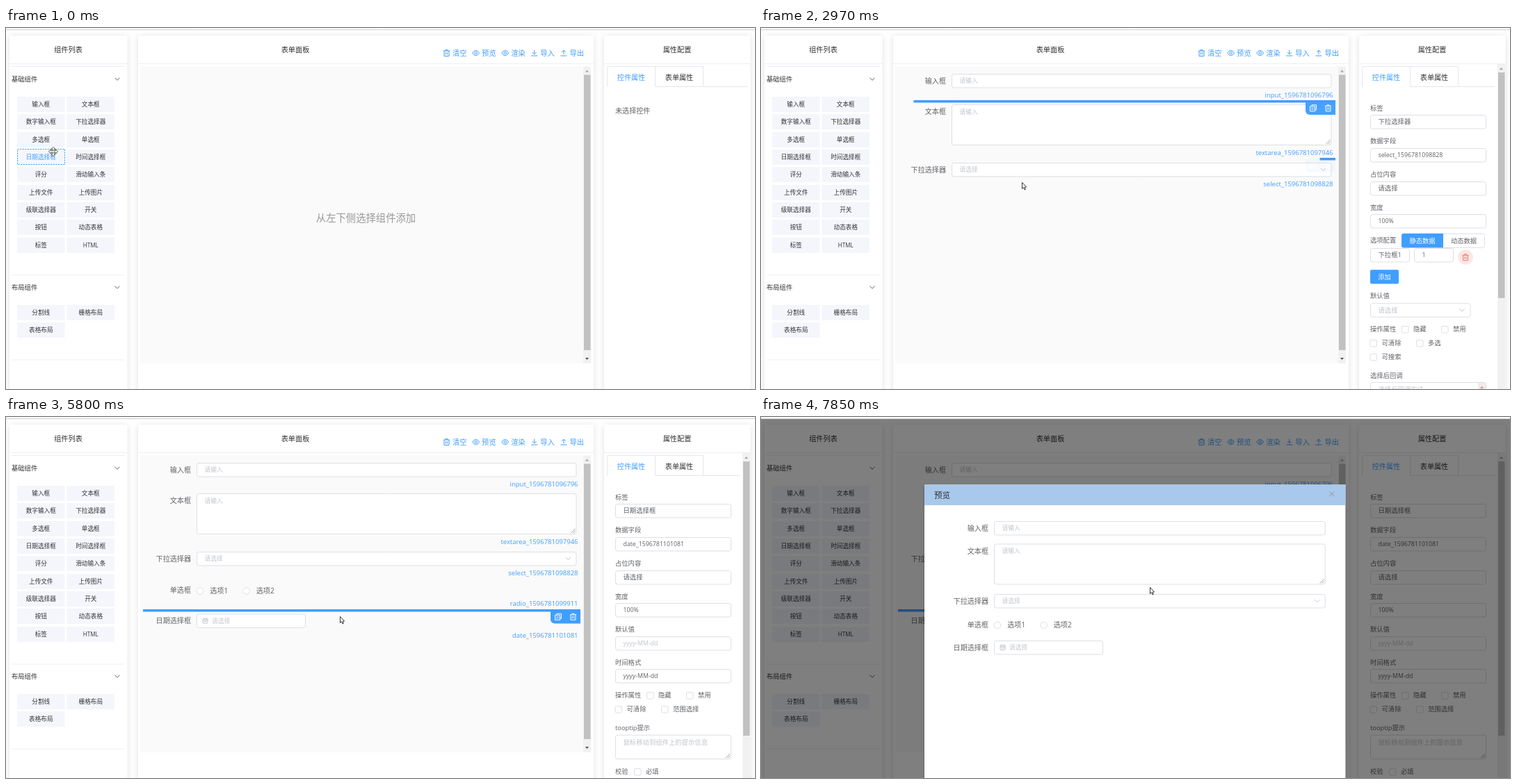
Recreate the animation shown at these times as an HTML page with a canvas. Size 1077x520 px, loop 8 s.

```html
<!DOCTYPE html>
<html lang="zh-CN">
<head>
<meta charset="utf-8">
<title>表单设计器</title>
<style>
html, body { margin: 0; width: 100%; height: 100%; overflow: hidden; background: #fff; }
canvas { display: block; }
</style>
</head>
<body>
<canvas id="stage" width="1077" height="520"></canvas>
<script>
const stage = document.getElementById('stage').getContext('2d');
const layer = document.createElement('canvas');
layer.width = 1077;
layer.height = 520;
const sheet = layer.getContext('2d');
let c = stage;

const FONT = '"Open Sans", "Noto Sans CJK SC", "Noto Sans CJK", sans-serif';
const BLUE = '#409eff', INK = '#303133', GREY = '#606266', HINT = '#c0c4cc', LINE = '#dcdfe6', PALE = '#ebeef5';
const LOOP = 8000;

const STEPS = [0, 200, 390, 570, 760, 940, 1130, 1330, 1540, 1740, 1950, 2150, 2350, 2550,
  2760, 2970, 3170, 3370, 3570, 3760, 3970, 4170, 4370, 4580, 4780, 5010, 5210, 5410, 5600,
  5800, 6020, 6210, 6410, 6620, 6830, 7030, 7240, 7430, 7640, 7850];

// Pointer path: time, x, y
const PATH = [[0, 68, 178], [390, 56, 112], [760, 350, 150], [940, 385, 170], [1330, 125, 112],
  [1540, 135, 114], [1950, 419, 191], [2150, 410, 190], [2550, 126, 138], [2970, 375, 222],
  [3170, 372, 222], [3570, 125, 162], [4170, 360, 262], [4780, 71, 186], [5210, 420, 287],
  [5410, 480, 287], [6020, 480, 287], [6830, 688, 42], [7240, 694, 35], [7430, 665, 105],
  [7850, 559, 245]];

const BASIC = ['输入框', '文本框', '数字输入框', '下拉选择器', '多选框', '单选框', '日期选择框', '时间选择框',
  '评分', '滑动输入条', '上传文件', '上传图片', '级联选择器', '开关', '按钮', '动态表格', '标签', 'HTML'];
const LAYOUT = ['分割线', '栅格布局', '表格布局'];

// y: label centre in the form, bar: top marker, thumb: end of the property scrollbar thumb
const FIELDS = [
  { name: '输入框', id: 'input_1596781096796', grab: 500, drop: 900, y: 76, idY: 96.5, bar: 61, thumb: 415, panel: inputPanel },
  { name: '文本框', id: 'textarea_1596781097946', grab: 1500, drop: 2040, y: 120.5, idY: 179, bar: 106, thumb: 440, panel: areaPanel },
  { name: '下拉选择器', id: 'select_1596781098828', grab: 2700, drop: 2928, y: 204, idY: 224.5, bar: 189, thumb: 389, panel: selectPanel },
  { name: '单选框', id: 'radio_1596781099911', grab: 3700, drop: 4011, y: 249.5, idY: 268.5, bar: 234.5, panel: radioPanel },
  { name: '日期选择框', id: 'date_1596781101081', grab: 4950, drop: 5181, y: 293.5, idY: 314, bar: 278.5, thumb: 459, panel: datePanel }
];

function text(s, x, y, size, color = GREY, align = 'left') {
  const latin = /^[\x20-\x7e]+$/.test(s);
  c.font = (latin ? size * 0.94 : size) + 'px ' + FONT;
  c.fillStyle = color;
  c.textAlign = align;
  c.fillText(s, x, y + size * 0.37);
}
function rect(x, y, w, h, color) {
  c.fillStyle = color;
  c.fillRect(x, y, w, h);
}
function box(x, y, w, h, fill, stroke, r = 3) {
  c.beginPath();
  c.roundRect(x, y, w, h, r);
  if (fill) { c.fillStyle = fill; c.fill(); }
  if (stroke) { c.strokeStyle = stroke; c.lineWidth = 1; c.stroke(); }
}
function lines(color, width, ...paths) {
  c.strokeStyle = color;
  c.lineWidth = width;
  c.beginPath();
  for (const p of paths)
    for (let i = 0; i < p.length; i += 2) i ? c.lineTo(p[i], p[i + 1]) : c.moveTo(p[i], p[i + 1]);
  c.stroke();
}
function disc(x, y, r, fill, stroke) {
  c.beginPath();
  c.arc(x, y, r, 0, 7);
  if (fill) { c.fillStyle = fill; c.fill(); }
  if (stroke) { c.strokeStyle = stroke; c.lineWidth = 1; c.stroke(); }
}
function poly(fill, ...p) {
  c.beginPath();
  for (let i = 0; i < p.length; i += 2) c.lineTo(p[i], p[i + 1]);
  c.closePath();
  c.fillStyle = fill;
  c.fill();
}
function chevron(x, y, color) { lines(color, 1, [x - 3.5, y - 1.8, x, y + 1.8, x + 3.5, y - 1.8]); }
function grip(x, y) { lines('#888', 0.8, [x - 6, y, x, y - 6], [x - 3, y, x, y - 3]); }

// Draws a group on its own layer, then blends it in as one picture
function faded(alpha, dy, draw) {
  sheet.clearRect(0, 0, 1077, 520);
  sheet.save();
  sheet.translate(0, dy);
  c = sheet;
  draw();
  c = stage;
  sheet.restore();
  c.globalAlpha = alpha;
  c.drawImage(layer, 0, 0);
  c.globalAlpha = 1;
}

const icons = {
  trash(x, y, color) {
    lines(color, 1, [x - 4.5, y - 3, x + 4.5, y - 3], [x - 1.5, y - 3, x - 1.5, y - 4.5, x + 1.5, y - 4.5, x + 1.5, y - 3],
      [x - 3.5, y - 3, x - 3.5, y + 4.5, x + 3.5, y + 4.5, x + 3.5, y - 3], [x - 1.2, y - 1, x - 1.2, y + 2.5], [x + 1.2, y - 1, x + 1.2, y + 2.5]);
  },
  eye(x, y, color) {
    c.beginPath();
    c.moveTo(x - 5, y);
    c.quadraticCurveTo(x, y - 7.5, x + 5, y);
    c.quadraticCurveTo(x, y + 7.5, x - 5, y);
    c.strokeStyle = color;
    c.lineWidth = 1;
    c.stroke();
    disc(x, y, 1.7, null, color);
  },
  load(x, y, color) { lines(color, 1, [x, y - 4.5, x, y + 1.5], [x - 2.8, y - 1, x, y + 1.8, x + 2.8, y - 1], [x - 4.5, y + 4, x + 4.5, y + 4]); },
  save(x, y, color) { lines(color, 1, [x, y + 2, x, y - 4], [x - 2.8, y - 1.2, x, y - 4, x + 2.8, y - 1.2], [x - 4.5, y + 4, x + 4.5, y + 4]); },
  copy(x, y, color) {
    lines(color, 1, [x - 2, y - 2.5, x - 2, y - 4.5, x + 4.5, y - 4.5, x + 4.5, y + 2.5, x + 2.5, y + 2.5]);
    box(x - 4.5, y - 2.5, 7, 7, null, color, 0);
    lines(color, 0.8, [x - 3, y, x + 1, y], [x - 3, y + 2, x + 1, y + 2]);
  },
  calendar(x, y) {
    box(x - 3.5, y - 3, 7, 6.5, null, HINT, 0.5);
    lines(HINT, 1, [x - 3.5, y - 1, x + 3.5, y - 1], [x - 2, y + 1, x + 2, y + 1], [x - 2, y - 4, x - 2, y - 2], [x + 2, y - 4, x + 2, y - 2]);
  }
};

function scrollbar(x, top, end, thumbEnd, withDown) {
  rect(x, top, 11, end - top, '#f1f1f1');
  poly('#a3a3a3', x + 3, top + 8, x + 5.5, top + 5, x + 8, top + 8);
  rect(x + 1, top + 12, 9.5, thumbEnd - top - 12, '#c1c1c1');
  if (withDown) poly('#505050', x + 3, end - 8, x + 5.5, end - 5, x + 8, end - 8);
}

function frame(x, w, title, titleX) {
  c.save();
  c.shadowColor = 'rgba(0,0,0,.12)';
  c.shadowBlur = 9;
  c.shadowOffsetY = 1.5;
  box(x, 11, w, 540, '#fff', null, 2);
  c.restore();
  lines(PALE, 1, [x, 51.5, x + w, 51.5]);
  text(title, titleX, 31, 10.2, INK, 'center');
}

const cellX = i => 16 + (i % 2) * 71.5;
const cellY = (i, top) => Math.round(top + Math.floor(i / 2) * 25.35);

function palette(hover) {
  frame(5, 169.5, '组件列表', 89.5);
  [55.5, 356, 478].forEach(y => lines(PALE, 1, [8, y, 171, y]));
  [['基础组件', 74, BASIC, 110], ['布局组件', 374, LAYOUT, 410]].forEach(([title, y, items, top]) => {
    text(title, 8, y, 9.3, INK);
    chevron(160, y - 0.5, '#606266');
    items.forEach((s, i) => {
      const x = cellX(i), cy = cellY(i, top), on = s === hover;
      rect(x, cy - 11, 68.5, 22, '#f4f6fc');
      if (on) {
        c.setLineDash([2.2, 1.4]);
        box(x + 0.5, cy - 11.5, 68, 22, null, BLUE, 0);
        c.setLineDash([]);
      }
      text(s, x + 34.3, cy, 8.64, on ? BLUE : '#333', 'center');
    });
  });
}

function entry(x, x2, y, s, hint, size = 9.36) {
  box(x + 0.5, y - 9.5, x2 - x - 1, 19.5, '#fff', LINE);
  text(s, x + 11.5, y, size, hint ? HINT : GREY);
}
function area(x, x2, y, h, s, size = 9.36) {
  box(x + 0.5, y + 0.5, x2 - x - 1, h - 1, '#fff', LINE);
  text(s, x + 11.5, y + 10.5, size, HINT);
  grip(x2 - 2, y + h - 2);
}
function radio(x, y, s, size) {
  disc(x, y, 4.8, '#fff', LINE);
  text(s, x + 14.2, y - 0.3, size);
}

// Form controls shared by the canvas and the preview dialog
function control(i, x, x2, y) {
  text(FIELDS[i].name, x - 8, y, 10.1, GREY, 'right');
  if (i === 0) entry(x, x2, y, '请输入', true, 8.7);
  if (i === 1) area(x, x2, y - 10.5, 59, '请输入', 8.7);
  if (i === 2) {
    entry(x, x2, y, '请选择', true, 8.7);
    chevron(x2 - 12, y, HINT);
  }
  if (i === 3) {
    radio(x + 5, y + 1, '选项1', 10.1);
    radio(x + 71.5, y + 1, '选项2', 10.1);
  }
  if (i === 4) {
    entry(x, x + 157, y, '', true);
    icons.calendar(x + 12.5, y);
    text('请选择', x + 22, y, 8.7, HINT);
  }
}

function marker(bar, p) {
  rect(197 + 629 * (1 - p), Math.round(bar - 1.6), 629 * p, 3.5, BLUE);
}
function actions(bar, alpha) {
  faded(alpha, 0, () => {
    box(783, bar - 1, 43, 20, BLUE, null, [0, 0, 0, 6]);
    icons.copy(794, bar + 9.3, '#fff');
    icons.trash(815.5, bar + 9.3, '#fff');
  });
}

function canvasPanel(t, placed, dragged, x) {
  frame(190, 655, '表单面板', 416);
  [['清空', 'trash'], ['预览', 'eye'], ['渲染', 'eye'], ['导入', 'load'], ['导出', 'save']].forEach(([s, icon], i) => {
    icons[icon](633.5 + 42.1 * i, 36, BLUE);
    text(s, 642 + 42.1 * i, 36, 10.3, BLUE);
  });
  rect(193, 55, 637, 428, '#fafafa');
  scrollbar(830, 55.5, 483, 464, true);
  const ghost = dragged && x > 193;
  if (!placed.length && !ghost) text('从左下侧选择组件添加', 517.5, 274, 14.35, '#999', 'center');
  placed.forEach((f, i) => {
    control(i, 274, 820.5, f.y);
    text(f.id, 822.5, f.idY, 10.1, BLUE, 'right');
  });
  const n = placed.length;
  if (n) {
    const k = Math.min(1, (t - placed[n - 1].drop) / 370), p = k * k * (3 - 2 * k);
    if (n > 1 && p < 1) {
      marker(placed[n - 2].bar, 1 - p);
      actions(placed[n - 2].bar, 1 - p);
    }
    marker(placed[n - 1].bar, p);
    actions(placed[n - 1].bar, p);
  }
  if (ghost) {
    marker(dragged.bar, 1);
    disc(198.5, dragged.bar + 6.5, 1.8, INK);
    text(dragged.name, 210, dragged.bar + 6.5, 10.1, GREY);
  }
}

// Property panel parts
const L = 876, R = 1043;
function caption(s, y) { text(s, L, y, 9.3); }
function prop(i, label, value, hint, right = R) {
  const y = 115.3 + i * 47.6;
  caption(label, y);
  entry(L, right, Math.round(y + 20), value, hint);
}
function common(f, hint, right) {
  prop(0, '标签', f.name, false, right);
  prop(1, '数据字段', f.id, false, right);
  if (hint) {
    prop(2, '占位内容', hint);
    prop(3, '宽度', '100%');
  }
}
function check(x, y, s) {
  box(x - 4.5, y - 4.5, 9.5, 9.5, '#fff', LINE, 1.5);
  text(s, x + 12, y, 9.36);
}
function flags(y, ...more) {
  caption('操作属性', y);
  check(926, y, '隐藏');
  check(983, y, '禁用');
  more.forEach((s, i) => check(i % 2 ? 947 : 880.5, y + 20 + 20 * (i >> 1), s));
}
function button(x, y, w, s) {
  box(x, y - 10, w, 20.3, BLUE, null, 2);
  text(s, x + w / 2, y, 9.3, '#fff', 'center');
}
function options(y, rows, w) {
  caption('选项配置', y);
  box(980.5, y - 9.5, 60, 20, '#fff', LINE, [0, 3, 3, 0]);
  box(921, y - 10, 60, 20.5, BLUE, null, [3, 0, 0, 3]);
  text('静态数据', 951, y + 1, 9.3, '#fff', 'center');
  text('动态数据', 1010.5, y + 1, 9.3, GREY, 'center');
  rows.forEach((s, i) => {
    const cy = y + 21 + i * 31.5, x = L + w + 6;
    entry(L, L + w, cy, s);
    entry(x, x + w, cy, String(i + 1));
    disc(x + w + 17, cy + 3, 11, '#fde7e6');
    icons.trash(x + w + 17, cy + 3.3, '#e8796b');
  });
  button(L, y + 52.3 + (rows.length - 1) * 31.3, 41, '添加');
}
function tip(y, right = R) {
  caption('tooptip提示', y);
  area(L, right, y + 9.7, 35.5, '鼠标移动到组件上的提示信息');
}
function verify(y) {
  caption('校验', y);
  check(908, y, '必填');
}

function inputPanel(f) {
  common(f, '请输入');
  prop(4, '默认值', '请输入', true);
  caption('前后缀', 353);
  entry(L, R, 372.5, '');
  entry(L, R, 392.5, '');
  box(876.5, 363, 48, 19.5, '#f5f7fa', LINE, [3, 0, 0, 3]);
  box(994.5, 383, 48, 19.5, '#f5f7fa', LINE, [0, 3, 3, 0]);
  text('前缀', 900, 372.5, 9.3, '#909399', 'center');
  text('前缀标签', 934.5, 372.5, 9.3, HINT);
  text('后缀标签', 887, 392.5, 9.3, HINT);
  text('后缀', 1018.5, 392.5, 9.3, '#909399', 'center');
  caption('回显字段', 420.5);
  entry(L, R, 440.5, '回显字段', true);
  flags(468, '可清除');
  caption('tooptip提示', 515.5);
}
function areaPanel(f) {
  common(f, '请输入');
  prop(4, '默认值', '请输入', true);
  flags(353.5, '可清除');
  tip(401);
  verify(464);
  entry(L, R, 484, '必填项');
  button(L, 504, 60, '增加校验');
}
function selectPanel(f) {
  common(f, '请选择');
  options(306, ['下拉框1'], 57);
  caption('默认值', 386);
  entry(L, 1020.5, 406.3, '请选择', true);
  chevron(1008, 406.3, HINT);
  flags(434, '可清除', '多选', '可搜索');
  caption('选择后回调', 501);
  area(L, R, 510, 40, '选择后回调方法');
  rect(1031, 511, 11, 9, '#f6e9e9');
  poly('#a3a3a3', 1034, 519, 1036.5, 516, 1039, 519);
}
function radioPanel(f) {
  common(f, null, 1055.5);
  options(211, ['选项1', '选项2'], 61.5);
  caption('默认值', 323);
  radio(917, 323.3, '选项1', 9.36);
  radio(982, 323.3, '选项2', 9.36);
  flags(349.5);
  tip(376.5, 1055.5);
  verify(439.5);
  entry(L, 1055.5, 459.3, '必填项');
  button(L, 479.5, 60, '增加校验');
  caption('动态显示', 508.3);
  text('关闭', 921, 508.8, 9.5, BLUE);
  box(947, 501.5, 28.5, 14, LINE, null, 7);
  disc(954, 508.5, 5.8, '#fff');
  text('打开', 982, 508.8, 9.5, INK);
}
function datePanel(f) {
  common(f, '请选择');
  prop(4, '默认值', 'yyyy-MM-dd', true);
  prop(5, '时间格式', 'yyyy-MM-dd');
  flags(401, '可清除', '范围选择');
  tip(448);
  verify(511);
}

function properties(f) {
  frame(860, 210.5, '属性配置', 965);
  const bar = f && f.thumb, edge = bar ? 1055.5 : 1067;
  lines('#e4e7ed', 1, [864.5, 85, 864.5, 55.5, 1002.5, 55.5, 1002.5, 85], [933.5, 55.5, 933.5, 84.5, edge, 84.5]);
  text('控件属性', 899, 71, 10.1, BLUE, 'center');
  text('表单属性', 968, 71, 10.1, INK, 'center');
  if (f) f.panel(f);
  else text('未选择控件', 876, 119, 10.1, GREY);
  if (bar) scrollbar(1059, 52, 520, bar, false);
}

function dialog(shade, alpha, dy) {
  rect(0, 3, 1077, 517, `rgba(0,0,0,${shade})`);
  faded(alpha, dy, () => {
    c.save();
    c.shadowColor = 'rgba(0,0,0,.3)';
    c.shadowBlur = 3;
    rect(235, 97.5, 605.5, 460, '#fff');
    c.restore();
    rect(235, 97.5, 605.5, 29.5, '#a8c8ec');
    text('预览', 249, 113, 11.6, INK);
    lines('#909399', 1, [817.3, 107.5, 824, 114.2], [824, 107.5, 817.3, 114.2]);
    [160, 193, 265, 299, 332].forEach((y, i) => control(i, 335, 811.8, y));
  });
}

function pointer(kind, x, y) {
  c.save();
  c.translate(x, y);
  c.lineJoin = 'round';
  if (kind === 'move') {
    for (let i = 0; i < 4; i++) {
      poly('#fff', -1.2, 0, -1.2, -3.6, -3, -3.6, 0, -6.6, 3, -3.6, 1.2, -3.6, 1.2, 0);
      c.strokeStyle = '#444';
      c.lineWidth = 0.9;
      c.stroke();
      c.rotate(Math.PI / 2);
    }
    rect(-1, -1, 2, 2, '#fff');
  } else {
    if (kind === 'hand') poly('#fff', -1, 0, 1, 0, 1, 3.5, 4.5, 4.5, 4.5, 7.5, 3, 10, -1, 10, -3.5, 6, -1, 6);
    else poly('#fff', 0.5, 0.5, 0.5, 9.5, 2.5, 7.7, 4, 11, 5.4, 10.3, 4, 7.2, 6.6, 7);
    c.strokeStyle = '#222';
    c.lineWidth = 0.9;
    c.stroke();
  }
  c.restore();
}

function place(t) {
  const i = PATH.findIndex(p => p[0] > t);
  if (i < 0) return PATH[PATH.length - 1].slice(1);
  const [t0, x0, y0] = PATH[i - 1], [t1, x1, y1] = PATH[i], k = (t - t0) / (t1 - t0);
  return [x0 + (x1 - x0) * k, y0 + (y1 - y0) * k];
}

function draw(t) {
  const [x, y] = place(t);
  const placed = FIELDS.filter(f => t >= f.drop);
  const dragged = FIELDS.find(f => t >= f.grab && t < f.drop);
  const over = BASIC.find((s, i) => x >= cellX(i) && x < cellX(i) + 69 && Math.abs(y - cellY(i, 110)) < 11);

  rect(0, 0, 1077, 520, '#fefefe');
  lines('#cfcfcf', 1, [0, 2.5, 1077, 2.5]);
  palette(dragged ? dragged.name : over);
  canvasPanel(t, placed, dragged, x);
  properties(placed[placed.length - 1]);
  if (t >= 7430) dialog(0.5, 1, 0);
  else if (t >= 7240) dialog(0.36, 0.48, -7.5);

  if (t >= 4780 && t < 5010) disc(x, y, 8, 'rgba(240,228,40,.75)');
  const onTool = x > 628 && y > 28 && y < 46;
  pointer(over && !dragged ? 'move' : onTool ? 'hand' : 'arrow', x, y);
}

const start = performance.now();
function tick() {
  const now = (performance.now() - start) % LOOP;
  draw(STEPS.filter(s => s <= now).pop() || 0);
  requestAnimationFrame(tick);
}
tick();
</script>
</body>
</html>
```
